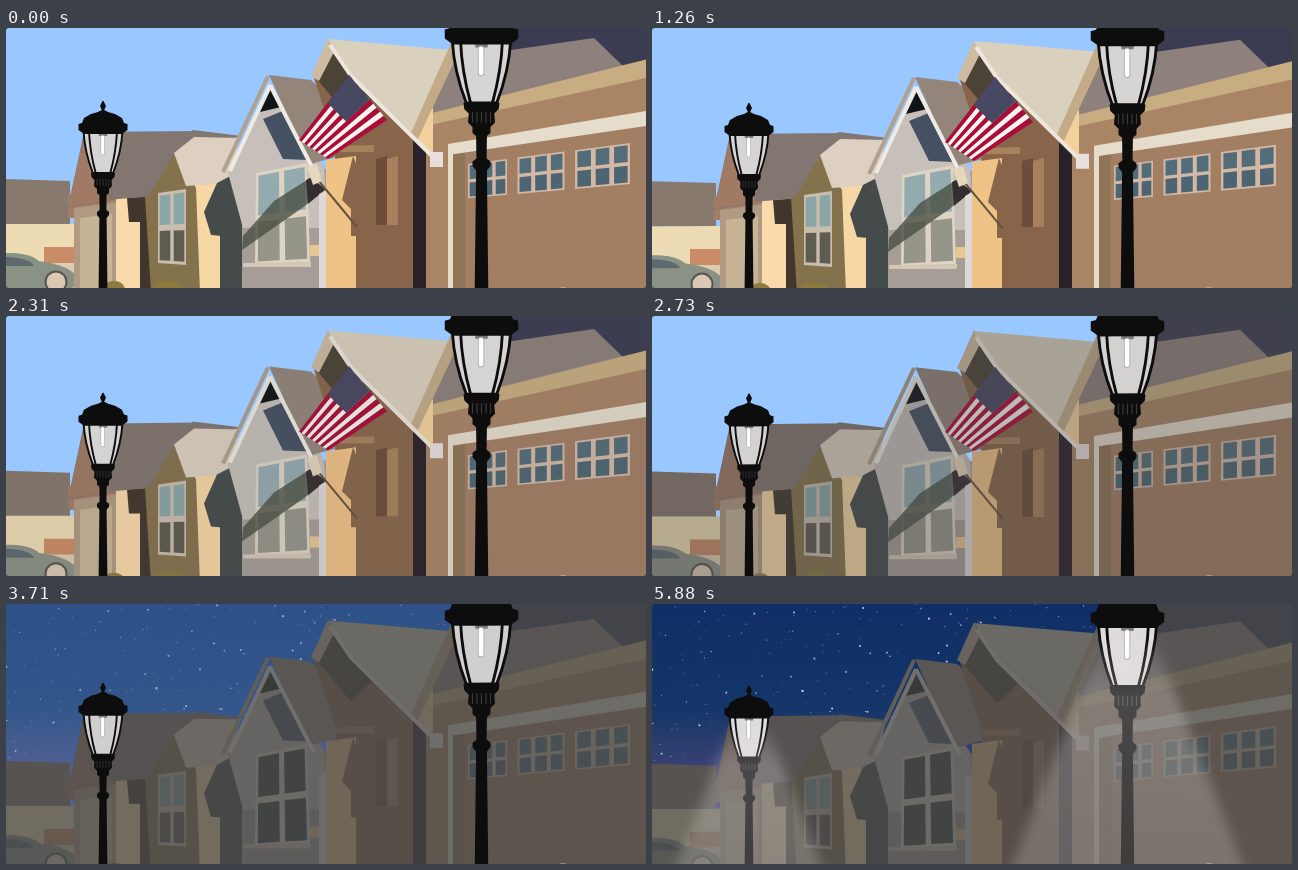
Recreate the animation shown at these times as an HTML page with a canvas. Size 640 by 260 pixels, loop 5950 ms.

```html
<!DOCTYPE html>
<html lang="en">
<head>
<meta charset="utf-8">
<title>Street at dusk</title>
<style>
html, body { margin: 0; width: 100%; height: 100%; overflow: hidden; background: #99c7ff; }
canvas { display: block; width: 640px; height: 260px; }
</style>
</head>
<body>
<canvas id="stage" width="640" height="260"></canvas>
<script>
const ctx = document.getElementById('stage').getContext('2d');
const LOOP = 5950, STEP = 70, GROUND = 264;
let night = 0;

const ramp = (t, a, b) => Math.min(1, Math.max(0, (t - a) / (b - a)));

// Daylight colour, pulled towards grey as night falls.
function shade(hex) {
  const k = night * 0.75;
  return `rgb(${[1, 3, 5].map(i => Math.round(parseInt(hex.slice(i, i + 2), 16) * (1 - k) + 70 * k))})`;
}

function fill(paint, p) {
  ctx.beginPath();
  for (let i = 0; i < p.length; i += 2) ctx.lineTo(p[i], p[i + 1]);
  ctx.fillStyle = paint;
  ctx.fill();
}
const poly = (color, ...p) => fill(shade(color), p);

// Upright wall with a sloping top, standing on the ground.
const wall = (color, x, x2, top, top2 = top, foot = GROUND) =>
  poly(color, x, top, x2, top2, x2, foot, x, foot);

function line(color, width, ...p) {
  ctx.beginPath();
  for (let i = 0; i < p.length; i += 2) ctx.lineTo(p[i], p[i + 1]);
  ctx.strokeStyle = shade(color);
  ctx.lineWidth = width;
  ctx.stroke();
}

function disc(paint, x, y, rx, ry = rx) {
  ctx.beginPath();
  ctx.ellipse(x, y, rx, ry, 0, 0, 7);
  ctx.fillStyle = paint;
  ctx.fill();
}

function faded(alpha, draw) {
  if (alpha <= 0) return;
  ctx.save();
  ctx.globalAlpha = alpha;
  draw();
  ctx.restore();
}

// Part of the four-sided shape q, u along its first side, v along its last.
function patch(q, u, v, u2, v2) {
  const at = (a, b) => [0, 1].map(i =>
    (q[i] * (1 - a) + q[i + 2] * a) * (1 - b) + (q[i + 6] * (1 - a) + q[i + 4] * a) * b);
  return [at(u, v), at(u2, v), at(u2, v2), at(u, v2)].flat();
}

function panes(frame, glass, cols, gap, q) {
  poly(frame, ...q);
  for (let c = 0; c < cols; c++) for (let r = 0; r < 2; r++) {
    poly(glass[r], ...patch(q, (c + gap) / cols, (r + gap * 0.7) / 2,
      (c + 1 - gap) / cols, (r + 1 - gap * 0.7) / 2));
  }
}

let seed = 41;
const rand = () => (seed = (seed * 16807) % 2147483647) / 2147483647;
const stars = Array.from({ length: 260 }, () => ({
  x: rand() * 460, y: rand() * 165 - 8, r: 0.45 + rand() ** 4 * 0.75, a: 0.4 + rand() * 0.6
}));

function sky(dark) {
  ctx.fillStyle = '#99c7ff';
  ctx.fillRect(0, -20, 640, 300);
  faded(dark, () => {
    const g = ctx.createLinearGradient(0, 0, 0, 160);
    g.addColorStop(0, '#0f2f66');
    g.addColorStop(0.6, '#153669');
    g.addColorStop(1, '#3d4374');
    ctx.fillStyle = g;
    ctx.fillRect(0, -20, 640, 300);
    for (const s of stars) disc(`rgba(228,236,255,${s.a})`, s.x, s.y, s.r);
  });
}

function car() {
  disc(shade('#8a9185'), 14, 252, 57, 20);
  disc(shade('#8a9185'), 4, 239, 32, 14);
  disc(shade('#5d6a70'), 0, 239, 28, 10);
  wall('#8a9185', -2, 34, 238);
  disc(shade('#55564f'), 50, 254, 11.5);
  disc(shade('#dac8b4'), 50, 254, 9.5);
}

function farHouses() {
  wall('#eddcb3', -2, 72, 196);
  wall('#87796e', -2, 64, 151, 153, 196);
  wall('#c98c66', 38, 70, 219, 219, 235);
  wall('#dccdb0', -2, 72, 235);
  car();

  // house with the brown gable
  wall('#a47d66', 62, 112, 166, 166, 190);
  wall('#b09a83', 68, 112, 180, 174);
  wall('#c7b497', 74, 106, 190, 186);
  wall('#fad9aa', 110, 147, 168);
  wall('#42362c', 134, 146, 170);
  poly('#42362c', 121, 170, 146, 168, 140, 194, 123, 194);
  poly('#837570', 78, 104, 192, 103, 150, 168, 112, 171, 62, 180);
  poly('#a07a65', 78, 107, 62, 179, 104, 172);

  // house with the pale hip roof
  wall('#f7d8a5', 180, 216, 152);
  poly('#84724d', 139, 168, 152, 130, 170, 124, 190, 160, 194, GROUND, 145, GROUND);
  poly('#827671', 137, 168, 149, 132, 187, 102, 236, 108, 168, 126, 143, 167);
  poly('#ddd0c0', 168, 125, 188, 109, 234, 110, 222, 155, 180, 158);
  panes('#c9bdae', ['#8aa6a6', '#5e5b50'], 2, 0.12, [152, 165, 180, 161, 180, 237, 152, 235]);
  wall('#454b4b', 214, 238, 156, 141);
  poly('#454b4b', 198, 184, 211, 155, 238, 141, 216, 208, 205, 207);
  for (const x of [108, 162]) disc(shade('#8d7b3d'), x, 261, x / 10, 8);
}

function midHouse(day) {
  wall('#a69d97', 236, 322, 141);
  poly('#c6bfba', 263, 56, 222, 145, 237, 200, 322, 200, 318, 140);
  poly('#94857a', 263, 47, 305, 52, 346, 90, 382, 104, 345, 125, 304, 136);
  poly('#0f1416', 265, 61, 254, 84, 275, 79);
  poly('#455063', 257, 91, 279, 82, 303, 132, 277, 131);
  line('#b0a08e', 4, 262, 48, 217, 144);
  for (const x of [224, 308]) line('#efebe4', 4, 264, 57, x, 143);

  const frame = [250, 145, 301, 135, 304, 234, 249, 237];
  panes('#ddd4c4', ['#93aaaf', '#969589'], 2, 0.1, frame);
  faded(1 - day, () => panes('#ddd4c4', ['#363c3c', '#363c3c'], 2, 0.1, frame));
  wall('#d3c7b6', 237, 305, 235, 234, 239);
  faded(day * 0.8, () => {
    poly('#4a5044', 236, 222, 237, 208, 268, 173, 304, 150, 320, 161, 296, 180);
    poly('#2b2026', 300, 152, 304, 150, 320, 161, 302, 176);
  });
  wall('#ded8d8', 313, 321, 166, 162);
  wall('#e8c690', 304, 313, 217, 217, 228);
}

function gableHouse() {
  // shaded wall, then the sunlit corner
  poly('#88654a', 322, 20, 308, 50, 330, 118, 320, GROUND, 410, GROUND, 410, 108);
  wall('#efc286', 320, 350, 132, 128);
  poly('#88654a', 347, 128, 336, 172, 345, 181, 345, 208, 350, 208, 356, 150);
  wall('#a8825c', 330, 368, 118, 117, 124);
  for (const x of [370, 381]) wall(x > 375 ? '#a8805d' : '#6d4d3a', x, x + 11, 131, 128, 197);
  poly('#4b4336', 322, 19, 310, 50, 345, 92, 366, 72);
  poly('#f3d19c', 410, 86, 427, 80, 427, 130, 404, 108);
  wall('#2a2029', 407, 420, 110, 123);

  poly('#dad0be', 322, 11, 446, 22, 408, 111, 345, 48);
  poly('#cdbba2', 322, 10, 305, 48, 313, 53, 328, 24);
  poly('#c3ab88', 445, 15, 450, 30, 411, 113, 404, 107);
  line('#efe6de', 4, 324, 17, 345, 48, 428, 130);
  wall('#e8dfdd', 424, 437, 124, 124, 139);
}

function flag() {
  line('#66523e', 2, 312, 152, 351, 199);
  poly('#e6d6bb', 301, 139, 311, 136, 316, 153, 307, 157);
  const q = [343, 47, 381, 92, 322, 131, 293, 112], n = 11;
  for (let i = 0; i < n; i++) {
    poly(i % 2 ? '#f8f3f0' : '#ac0c38', ...patch(q, i / n, 0, (i + 1) / n, 1));
  }
  poly('#474861', ...patch(q, 0, 0, 6 / n, 0.43));
}

// Level edges of the garage flatten out towards eye height.
const edge = (y, x) => y - (x - 442) * 0.25 * 2 ** ((81 - y) / 60);
const strip = (color, x, x2, top, foot) =>
  poly(color, x, edge(top, x), x2, edge(top, x2), x2, edge(foot, x2), x, edge(foot, x));

function garage() {
  wall('#3b3c51', 500, 642, -20);
  poly('#8e807d', 418, 90, 448, 28, 505, 22, 588, 10, 618, 39, 530, 70);
  wall('#a98465', 420, 642, edge(90, 420), edge(90, 642));
  strip('#c8ad82', 418, 642, 81, 93);
  wall('#8f7456', 443, 461, 120);
  wall('#a27e63', 459, 642, edge(125, 459), edge(125, 642));
  strip('#e5dccb', 442, 642, 116, 127);
  wall('#e5dccb', 442, 447, 117);
  for (let i = 0; i < 3; i++) {
    const x = 462 + 45.5 * i + 4 * i * i, x2 = x + 39 + 8 * i;
    panes('#d3b8a6', ['#536c79', '#4d6572'], 3, 0.13,
      [x, edge(138.5, x), x2, edge(138.5, x2), x2, edge(172, x2), x, edge(172, x)]);
  }
}

// Mirrored outline from pairs of height and half width.
function turned(paint, ...p) {
  const right = [], left = [];
  for (let i = 0; i < p.length; i += 2) {
    right.push(p[i + 1], p[i]);
    left.unshift(-p[i + 1], p[i]);
  }
  fill(paint, [...right, ...left]);
}

function placed(x, y, scale, draw) {
  ctx.save();
  ctx.translate(x, y);
  ctx.scale(scale, scale);
  draw();
  ctx.restore();
}

// Height 0 is where the glass meets the brim.
function lamp(glow) {
  const ink = '#0d0d0e', v = 212 + 14 * glow - 6 * night;
  turned(`rgb(${v + 3},${v},${v})`, -2, 19, 18, 17, 40, 10);
  turned('#77787a', -4, 5, 3, 4);
  ctx.lineCap = 'round';
  for (const [paint, w] of [['#a3a2a3', 4.2], ['#fff', 3.2]]) {
    ctx.strokeStyle = paint;
    ctx.lineWidth = w;
    ctx.beginPath(); ctx.moveTo(-0.3, 4); ctx.lineTo(-0.3, 20); ctx.stroke();
  }
  ctx.strokeStyle = ink;
  ctx.lineWidth = 1.9;
  for (const w of [-19.5, -14, 14, 19.5]) {
    ctx.beginPath();
    ctx.moveTo(w, -2);
    ctx.quadraticCurveTo(w * 0.94, 19, w * 0.52, 40);
    ctx.stroke();
  }
  turned(ink, -32, 0.5, -27, 3, -23, 1.2, -21, 5, -19, 12, -15, 19, -10, 21,
    -9, 24.5, -3, 24.5, 1, 19, 1, 0);
  turned(ink, 39, 10, 40, 12, 44, 11.5, 47, 8.5, 53, 9, 56, 6, 60, 6, 62, 3.6,
    77, 3.4, 79, 6, 82, 6, 85, 3.6, 170, 4.6);
  ctx.fillStyle = '#3a3a3b';
  for (let i = -2; i <= 2; i++) ctx.fillRect(i * 3 - 0.4, 46, 0.8, 7);
}

function beam() {
  const g = ctx.createLinearGradient(0, 15, 0, 165);
  g.addColorStop(0, 'rgba(232,226,222,0.1)');
  g.addColorStop(0.2, 'rgba(232,226,222,0.28)');
  g.addColorStop(1, 'rgba(232,226,222,0.22)');
  ctx.filter = 'blur(6px)';
  turned(g, 12, 19, 180, 85);
}

function render(time) {
  const n = Math.floor((time % LOOP) / STEP);
  // every tenth step holds the picture
  const t = (n - Math.floor(n / 10)) * STEP * 10 / 9;
  const drift = ramp(t, 0, 5460);
  const day = 1 - ramp(t, 2950, 3640);
  night = ramp(t, 2100, 3700);

  ctx.setTransform(1, -0.0027 * drift, 0, 1, 0, 8.8 * drift);
  sky(ramp(t, 2800, 4000));
  farHouses();
  midHouse(day);
  garage();
  gableHouse();
  faded(day, flag);
  const lamps = [
    { at: [97, 105, 1], glow: ramp(t, 3800, 4420) },
    { at: [475.5, 15, 1.5], glow: ramp(t, 4440, 5060) }
  ];
  for (const { at, glow } of lamps) placed(...at, () => lamp(glow));
  for (const { at, glow } of lamps) faded(glow, () => placed(...at, beam));

  ctx.setTransform(1, 0, 0, 1, 0, 0);
  disc('#e8e4dc', 557, 261.5, 5, 2);
  // rounded stage corners
  ctx.fillStyle = '#4a4a4a';
  ctx.beginPath();
  ctx.rect(0, 0, 640, 260);
  ctx.roundRect(0, 0, 640, 260, 3);
  ctx.fill('evenodd');
}

const start = performance.now();
function tick() {
  render(performance.now() - start);
  requestAnimationFrame(tick);
}
tick();
</script>
</body>
</html>
```
